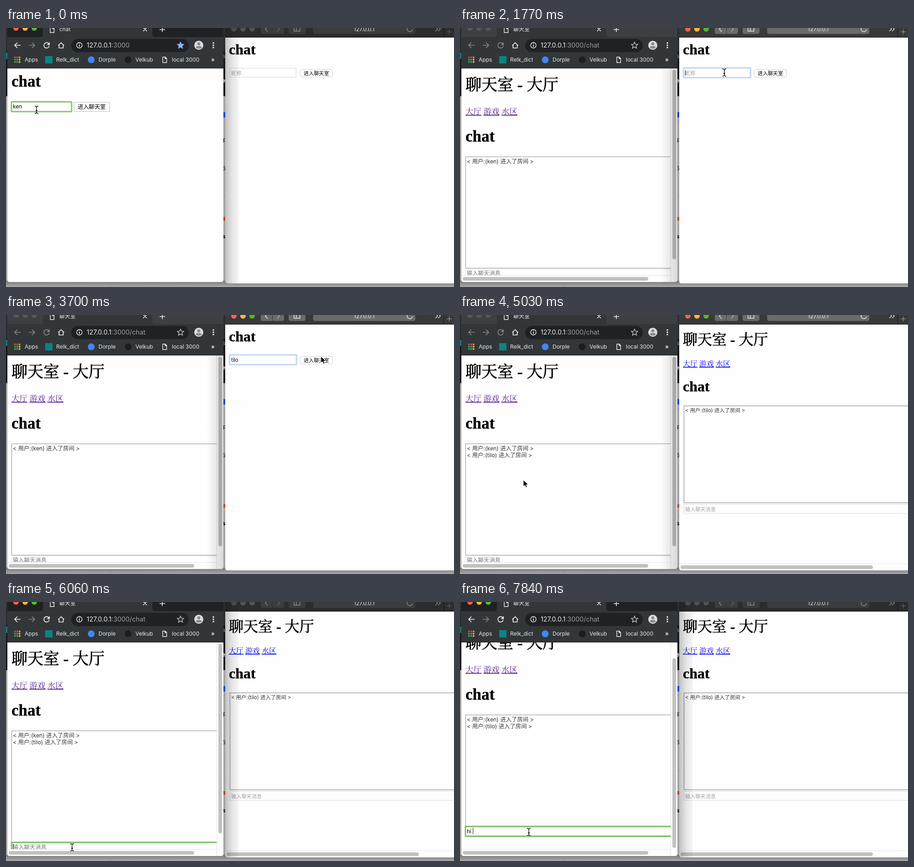
Animation of 983 by 570 pixels, one loop 8 s. Source, as an HTML page:

```html
<!DOCTYPE html>
<html lang="zh-CN">
<head>
<meta charset="utf-8">
<title>chat</title>
<style>
html, body { margin: 0; width: 100%; height: 100%; overflow: hidden; background: #a3a3a3 }
svg { display: block; width: 983px; height: 570px }
text { font: 12px Inter, "Noto Sans CJK SC", sans-serif; white-space: pre }
.serif text { font-family: "Liberation Serif", "Noto Serif CJK SC", "Noto Sans CJK SC", serif; font-size: 17.5px }
.serif .h { font-size: 35px; font-weight: bold; stroke: #000; stroke-width: .4 }
.serif .room { font-weight: normal; stroke-width: .7 }
#right .serif text { font-size: 16px }
#right .serif .h { font-size: 32px }
#right .small text { font-size: 11.2px }
.link { text-decoration: underline; fill: #551a8b }
#right .link { fill: #00e }
.log text { fill: #333; font-size: 12.35px }
#right .log text { font-size: 11.35px }
.hint { fill: #757575 }
#right .hint { fill: #a0a0a0 }
.line { fill: none; stroke: #f1f3f4; stroke-width: 1.7 }
.thumb { fill: #c1c1c1 }
.label { fill: #e8eaed }

/* window chrome, by which window is in front */
.frame { fill: #202124 }
.rightFront .frame { fill: #3c4043 }
.rightFront .nav { stroke: #85888b }
.rightFront .nav .tip { fill: #85888b }
.tip { fill: #f1f3f4 }
.rightFront #left .light { fill: #575a5d }
.bar { fill: #2b2c2d }
.key, .field { fill: #3b3c3d }
.glyph { fill: none; stroke: #8b8b8b; stroke-width: 1.5 }
.plus { fill: none; stroke: #666 }
#right .light { fill: #515253 }
.rightFront #right .r { fill: #ff5f57 }
.rightFront #right .y { fill: #febc2e }
.rightFront #right .g { fill: #55b72c }
.rightFront .bar { fill: #39393a }
.rightLit .key, .rightLit .field { fill: #696a6a }
.rightLit .glyph { stroke: #e6e6e6 }
.rightLit .plus { stroke: #aaa }
.r { fill: #ff5f57 } .y { fill: #febc2e } .g { fill: #55c12c }
#leftShade, .rightFront #rightShade { display: none }
.rightFront #leftShade { display: inline }
</style>
</head>
<body>
<svg id="stage" viewBox="0 0 983 570">
  <defs>
    <linearGradient id="fadeRight"><stop stop-opacity=".24"/><stop offset=".5" stop-opacity=".1"/><stop offset="1" stop-opacity=".03"/></linearGradient>
    <linearGradient id="fadeLeft"><stop stop-opacity="0"/><stop offset="1" stop-opacity=".15"/></linearGradient>
    <linearGradient id="floor" x2="0" y2="1"><stop stop-color="#777"/><stop offset="1" stop-color="#a9a9a9"/></linearGradient>
    <clipPath id="leftPage"><path d="M3 89H462.500V544.500H3z"/></clipPath>
    <path id="doc" d="M-4-6H1.500L4.500-3V6H-4zM1-6V-2.500H4.500" class="line" style="stroke-width:1.4"/>
    <path id="again" d="M4.500-4A6 6 0 1 0 6 1.500"/>
    <path id="beamShape" d="M-4-8Q0-8 0-5Q0-8 4-8M0-6V6M-4 8Q0 8 0 5Q0 8 4 8M-2 2H2"/>
  </defs>

  <!-- desktop -->
  <path fill="#a3a3a3" d="M0 0H983V570H0z"/>
  <path fill="#17181a" d="M0 0H490V150H0z"/>
  <path fill="#2c2d2f" d="M0 0H490V52H0z"/>
  <path fill="#177" d="M0 54H3V68H0z"/>
  <path fill="url(#floor)" d="M0 556H983V570H0z"/>
  <path stroke="#8b8b8b" d="M228.500 558V570M470 205.500H490M470 370.500H490M470 443.500H490M0 268.500H3"/>
  <path fill="#1a49cf" d="M470 185H490V197H470z"/>
  <path fill="#c2431c" d="M470 416H490V424H470z"/>
  <text x="475" y="66" fill="#999">s</text>
  <text x="474" y="120" fill="#eee" style="font-weight:bold">e</text>
  <text x="476" y="252">P</text><text x="475" y="313">5</text>
  <text x="475" y="463" style="font-weight:bold">s</text>

  <g id="right">
    <path fill="#fefefe" d="M481 20H983V562H486q-5 0-5-5z"/>
    <path class="bar" d="M481 0H983V20H481z"/>
    <path stroke="#111" d="M481 20.500H983M960.500 0V20"/>
    <circle class="light r" cx="500" cy="2" r="6"/><circle class="light y" cx="520" cy="2" r="6"/><circle class="light g" cx="540" cy="2" r="6"/>
    <path class="key" d="M559 0H584V13H563q-4 0-4-4zM585 0H610V9q0 4-4 4H585zM620 0H657V9q0 4-4 4H624q-4 0-4-4z"/>
    <path class="field" d="M674 0H898V9q0 4-4 4H678q-4 0-4-4z"/>
    <path class="glyph" d="M574-3L569 2.500L574 8M632-3V7H645V-3M637-3V7M943-3L947 2.500L942 7M949-3L953 2.500L948 7"/>
    <path class="glyph" opacity=".55" d="M595-3L600 2.500L595 8"/>
    <path class="plus" d="M967 8.500H978M972.500 3V14"/>
    <use href="#again" x="886" y="2" class="glyph"/>
    <text x="763" y="7" class="label">127.0.0.1</text>

    <g id="rightLogin">
      <g class="serif"><text class="h" x="489" y="58">chat</text></g>
      <rect id="rightRing" x="490" y="87.500" width="148" height="22" rx="2" fill="none" stroke="#cfdff8" stroke-width="3"/>
      <rect id="rightInput" x="491.500" y="88.500" width="145" height="20" fill="#fff"/>
      <rect x="645.500" y="91" width="71" height="17" rx="4" fill="#fff" stroke="#cfcfcf"/>
      <g class="small">
        <text x="653" y="103.500">进入聊天室</text>
        <text id="rightHint" class="hint" x="494" y="103.500">昵称</text>
        <text id="rightTyped" x="494" y="103"></text>
      </g>
      <path id="rightCaret" stroke="#111" d="M.5 93V105"/>
    </g>
    <g id="rightRoom">
      <g class="serif">
        <text class="h room" x="489" y="65">聊天室 - 大厅</text>
        <text class="link" x="489" y="113">大厅</text><text class="link" x="525" y="113">游戏</text><text class="link" x="561" y="113">水区</text>
        <text class="h" x="489" y="168">chat</text>
      </g>
      <path fill="none" stroke="#a2a2a2" stroke-width="1.500" d="M990 200H491.500V413.300H990"/>
      <path fill="none" stroke="#d8d8d8" d="M990 416.500H491.500V436.500H990"/>
      <g class="log"><text x="494" y="213.500">&lt; 用户:(tilo) 进入了房间 &gt;</text></g>
      <g class="small"><text class="hint" x="494" y="431.500">输入聊天消息</text></g>
      <path stroke="#e6e6e6" d="M481 547.500H983"/>
      <rect class="thumb" x="484" y="551" width="422" height="8" rx="4"/>
    </g>
    <path id="rightShade" fill="url(#fadeRight)" d="M481 0H511V562H481z"/>
  </g>

  <g id="left">
    <path fill="#fefefe" d="M3 88H477V554q0 5-5 5H8q-5 0-5-5z"/>
    <path class="frame" d="M3 0H477V22H3z"/>
    <path fill="#323639" d="M3 20H75q6 0 6-6V0H321V14q0 6 6 6H477V89H3z"/>
    <path stroke="#1b1c1e" d="M3 88.500H477"/>
    <circle class="light r" cx="22" cy="0" r="6"/><circle class="light y" cx="42" cy="0" r="6"/><circle class="light g" cx="62" cy="0" r="6"/>
    <use href="#doc" x="101" y="4"/>
    <text id="tab" class="label" x="117" y="7"></text>
    <path class="line" style="stroke-width:1.500" d="M301-1L309 7M309-1L301 7M337 3.500H349M343-2V9"/>
    <g class="line nav">
      <path d="M32 38H19.500M25 32L19 38L25 44"/>
      <use href="#again" x="89" y="38"/>
      <path class="tip" stroke="none" d="M96 31V37.500H89.500z"/>
    </g>
    <path class="line" style="stroke:#85888b" d="M50 38H62.500M57 32L63 38L57 44"/>
    <path class="line" d="M114.500 38.500L121 32.500L127.500 38.500M116.500 37.500V44H125.500V37.500"/>
    <rect x="143" y="24" width="258" height="29" rx="14.500" fill="#202124"/>
    <circle class="line" style="stroke-width:1.400" cx="161" cy="38" r="6"/>
    <path class="line" d="M161 37V41.500M161 34V35.500"/>
    <text class="label" x="177" y="43" style="font-size:14.300px">127.0.0.1<tspan id="path" fill="#9aa0a6"></tspan></text>
    <path id="star" stroke-width="1.400" transform="translate(383 38)" d="M0-7l2 4.700 5 .4-3.800 3.400 1.200 5L0 3.900-4.400 6.500l1.200-5L-7-1.900l5-.4z"/>
    <circle cx="423" cy="38" r="10" fill="#dadce0"/>
    <path fill="#85898d" d="M423 31.500a3 3 0 0 1 0 6.500a3 3 0 0 1 0-6.500M416.500 43.500q0-4 6.500-4t6.500 4q-6.500 4-13 0z"/>
    <path fill="#f1f3f4" d="M453.500 31.500h3v3h-3zM453.500 36.500h3v3h-3zM453.500 41.500h3v3h-3z"/>
    <g id="apps"></g>
    <rect x="86" y="62" width="16" height="16" fill="#0a8484"/>
    <circle cx="187" cy="70" r="7.500" fill="#4285f4"/>
    <circle cx="268" cy="70" r="7.500" fill="#1b1e21"/>
    <use href="#doc" x="348" y="70"/>
    <g class="label">
      <text x="41" y="74">Apps</text><text x="110" y="74">Relk_dict</text><text x="203" y="74">Dorple</text>
      <text x="284" y="74">Velkub</text><text x="364" y="74">local 3000</text><text x="450" y="74" style="font-weight:bold">»</text>
    </g>

    <g id="leftLogin">
      <g class="serif"><text class="h" x="12" y="129">chat</text></g>
      <rect x="12" y="162.500" width="132" height="21.500" rx="1" fill="#fff" stroke="#86c573" stroke-width="3"/>
      <text x="15" y="177">ken</text>
      <rect x="149.500" y="163.500" width="78" height="20" fill="#fff" stroke="#bcbcbc"/>
      <text x="157" y="177.500" style="font-size:12.400px">进入聊天室</text>
    </g>
    <g id="leftRoom">
      <g clip-path="url(#leftPage)"><g id="scroller">
        <g class="serif">
          <text class="h room" x="12" y="137">聊天室 - 大厅</text>
          <text class="link" x="12" y="190">大厅</text><text class="link" x="51.500" y="190">游戏</text><text class="link" x="91" y="190">水区</text>
          <text class="h" x="12" y="250">chat</text>
        </g>
        <path fill="none" stroke="#8e8e8e" d="M480 283.500H12.500V528.500H480"/>
        <g class="log">
          <text x="15" y="298">&lt; 用户:(ken) 进入了房间 &gt;</text>
          <text id="joined" x="15" y="313">&lt; 用户:(tilo) 进入了房间 &gt;</text>
        </g>
        <path fill="none" stroke="#dcdcdc" d="M480 530.500H12.500V550.500H480"/>
        <rect id="leftRing" x="12" y="529" width="480" height="21.500" rx="1" fill="#fff" stroke="#76bb62" stroke-width="2.800"/>
        <text id="leftHint" class="hint" x="15" y="543.500" style="font-size:12.300px">输入聊天消息</text>
        <text id="leftTyped" x="15" y="544"></text>
        <path id="leftCaret" stroke="#111" d="M.5 532V546"/>
      </g></g>
      <path fill="none" stroke="#e4e4e4" d="M462.500 89V559M3 544.500H462"/>
      <rect id="thumb" class="thumb" x="466" width="8" height="417" rx="4"/>
      <rect class="thumb" x="6" y="548" width="407" height="8" rx="4"/>
    </g>
    <path id="leftShade" fill="url(#fadeLeft)" d="M440 89H477V559H440z"/>
  </g>

  <g id="mouse">
    <path id="arrow" stroke="#fff" d="M0 0V14.500L3.400 11.400L5.800 16.600L8.400 15.400L6 10.400H10.600z"/>
    <g id="beam" fill="none">
      <use href="#beamShape" stroke="#fff" stroke-width="2.600"/>
      <use href="#beamShape" stroke="#000" stroke-width="1.300"/>
    </g>
  </g>
</svg>
<script>
const LOOP = 8000, TICK = 147.8;
const $ = id => document.getElementById(id);
const show = (id, on) => { $(id).style.display = on ? 'inline' : 'none'; };
const within = (n, from, to) => n >= from && n < to;

// mouse stops: tick, x, y
const stops = [
  [1, 67, 180], [4, 186, 173], [6, 186, 173], [8, 580, 97], [10, 580, 98], [19, 580, 98],
  [22, 764, 26], [25, 691, 91], [30, 691, 91], [34, 139, 363], [37, 145, 540],
  [41, 145, 540], [42, 148, 556], [43, 150, 545], [46, 151, 506], [60, 151, 506]
];

function mouseAt(n) {
  const i = Math.max(1, stops.findIndex(s => s[0] > n));
  const [t0, x0, y0] = stops[i - 1], [t1, x1, y1] = stops[i];
  const k = Math.max(0, (n - t0) / (t1 - t0));
  return [x0 + (x1 - x0) * k, y0 + (y1 - y0) * k];
}

function field(side, text, caret) {
  const typed = $(side + 'Typed');
  typed.textContent = text;
  show(side + 'Hint', !text);
  show(side + 'Caret', caret);
  const x = +typed.getAttribute('x') + (text ? typed.getComputedTextLength() : 0);
  $(side + 'Caret').setAttribute('transform', `translate(${Math.round(x)} 0)`);
}

function draw(n) {
  const inRoom = n >= 5, rightInRoom = n >= 27, rightFront = within(n, 9, 38);
  $('stage').classList.toggle('rightFront', rightFront);
  $('stage').classList.toggle('rightLit', within(n, 10, 38));

  show('leftLogin', !inRoom);
  show('leftRoom', inRoom);
  $('tab').textContent = inRoom ? '聊天室' : 'chat';
  $('path').textContent = inRoom ? ':3000/chat' : ':3000';
  $('star').setAttribute('fill', inRoom ? 'none' : '#8ab4f8');
  $('star').setAttribute('stroke', inRoom ? '#c4c7ca' : '#8ab4f8');
  show('joined', n >= 28);
  show('leftRing', n >= 38);

  const scroll = 35 * Math.min(1, Math.max(0, (n - 42) / 3));
  $('scroller').setAttribute('transform', `translate(0 ${-scroll})`);
  $('thumb').setAttribute('y', 92 + scroll * 32 / 35);
  field('left', 'hi '.slice(0, Math.max(0, n - 50)), n >= 38 && !within(n, 48, 51));

  show('rightLogin', !rightInRoom);
  show('rightRoom', rightInRoom);
  show('rightRing', n >= 12);
  $('rightInput').setAttribute('stroke', n >= 12 ? '#a9c3ee' : '#d6d6d6');
  const letters = n < 15 ? 0 : n < 19 ? Math.min(3, n - 14) : 4;
  field('right', 'tilo'.slice(0, letters), within(n, 12, 20));

  const beam = n < 3 || within(n, 10, 15) || n >= 37;
  show('beam', beam);
  show('arrow', !beam);
  show('mouse', !within(n, 15, 20));
  $('mouse').setAttribute('transform', `translate(${mouseAt(n)})`);
}

const appColors = ['#ea4335', '#ea4335', '#f29900', '#34a853', '#4285f4', '#fbbc04', '#34a853', '#34a853', '#fbbc04'];
$('apps').innerHTML = appColors.map((c, i) =>
  `<rect x="${18 + i % 3 * 5}" y="${63 + Math.floor(i / 3) * 5}" width="3.5" height="3.5" fill="${c}"/>`).join('');

let shown = -1;
function loop() {
  const n = Math.floor((performance.now() % LOOP + 8) / TICK);
  if (n !== shown) draw(shown = n);
  requestAnimationFrame(loop);
}
loop();
</script>
</body>
</html>
```
